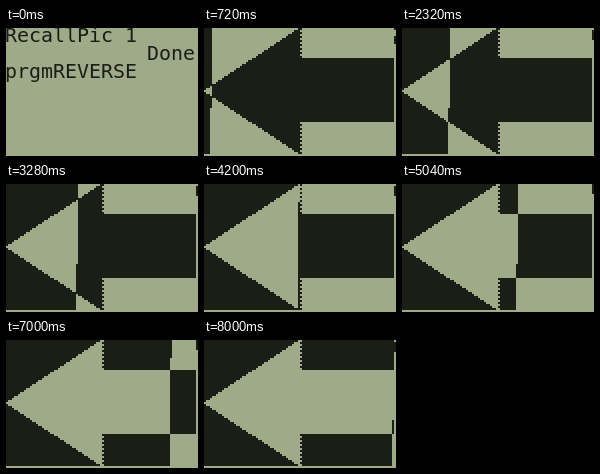
Write an HTML page with a canvas that moves like this. It is 192x128 px and loops after 8040 ms.

```html
<!DOCTYPE html>
<html lang="en">
<head>
<meta charset="utf-8">
<title>Reverse</title>
<style>
  html, body { margin: 0; width: 100%; height: 100%; overflow: hidden; background: #9fab88; }
  canvas { position: absolute; left: 0; top: 0; width: 192px; height: 128px; image-rendering: pixelated; }
  #home { position: absolute; left: 0; top: 0; width: 192px; height: 128px; }
  text { font: 19.93px "DejaVu Sans Mono", monospace; fill: #1b1d17; }
</style>
</head>
<body>
<canvas id="lcd" width="96" height="64"></canvas>
<svg id="home" viewBox="0 0 192 128">
  <text x="-1" y="14">RecallPic 1</text>
  <text x="189" y="32" text-anchor="end">Done</text>
  <text x="-1" y="50">prgmREVERSE</text>
</svg>
<script>
const LIGHT = '#9fab88', DARK = '#1b1d17';
const COLS = 95, ROWS = 63, MID = 31, BASE = 48;
const LOOP = 8040, START = 320, STEP = 40;

const lcd = document.getElementById('lcd');
const home = document.getElementById('home');
const ctx = lcd.getContext('2d');

function arrow(fore, back) {
  const pic = document.createElement('canvas');
  pic.width = COLS;
  pic.height = ROWS;
  const g = pic.getContext('2d');
  g.fillStyle = back;
  g.fillRect(0, 0, COLS, ROWS);
  g.fillStyle = fore;
  for (let x = 0; x < BASE; x++) {
    const half = Math.round(x * MID / (BASE - 1));
    g.fillRect(x, MID - half, 1, 2 * half + 1);
  }
  for (let y = 0; y < ROWS; y += 2) g.fillRect(BASE, y, 1, 1);
  g.fillRect(BASE, 15, COLS - BASE, 32);
  return pic;
}

const plain = arrow(DARK, LIGHT);
const inverse = arrow(LIGHT, DARK);

function reveal(x, w, h) {
  if (w > 0 && h > 0) ctx.drawImage(inverse, x, 0, w, h, x, 0, w, h);
}

// Busy mark: five lit rows rotating through eight
function busy(step) {
  ctx.fillStyle = DARK;
  const shift = Math.floor(step / 3);
  for (let i = 0; i < 5; i++) ctx.fillRect(COLS, (i + 1 + shift) % 8, 1, 1);
}

function draw(now) {
  const t = now % LOOP;
  const running = t >= START;
  home.style.display = running ? 'none' : 'block';
  ctx.fillStyle = LIGHT;
  ctx.fillRect(0, 0, 96, 64);
  if (running) {
    const step = Math.floor((t - START) / STEP);
    // Each column takes two steps, inverted from the top down
    const done = Math.max(0, step / 2 - 1.35);
    const col = Math.floor(done);
    ctx.drawImage(plain, 0, 0);
    reveal(0, col, ROWS);
    reveal(col, 1, Math.floor((done - col) * ROWS));
    busy(step);
  }
}

const origin = performance.now();
function tick() {
  draw(performance.now() - origin);
  requestAnimationFrame(tick);
}
tick();
</script>
</body>
</html>
```
